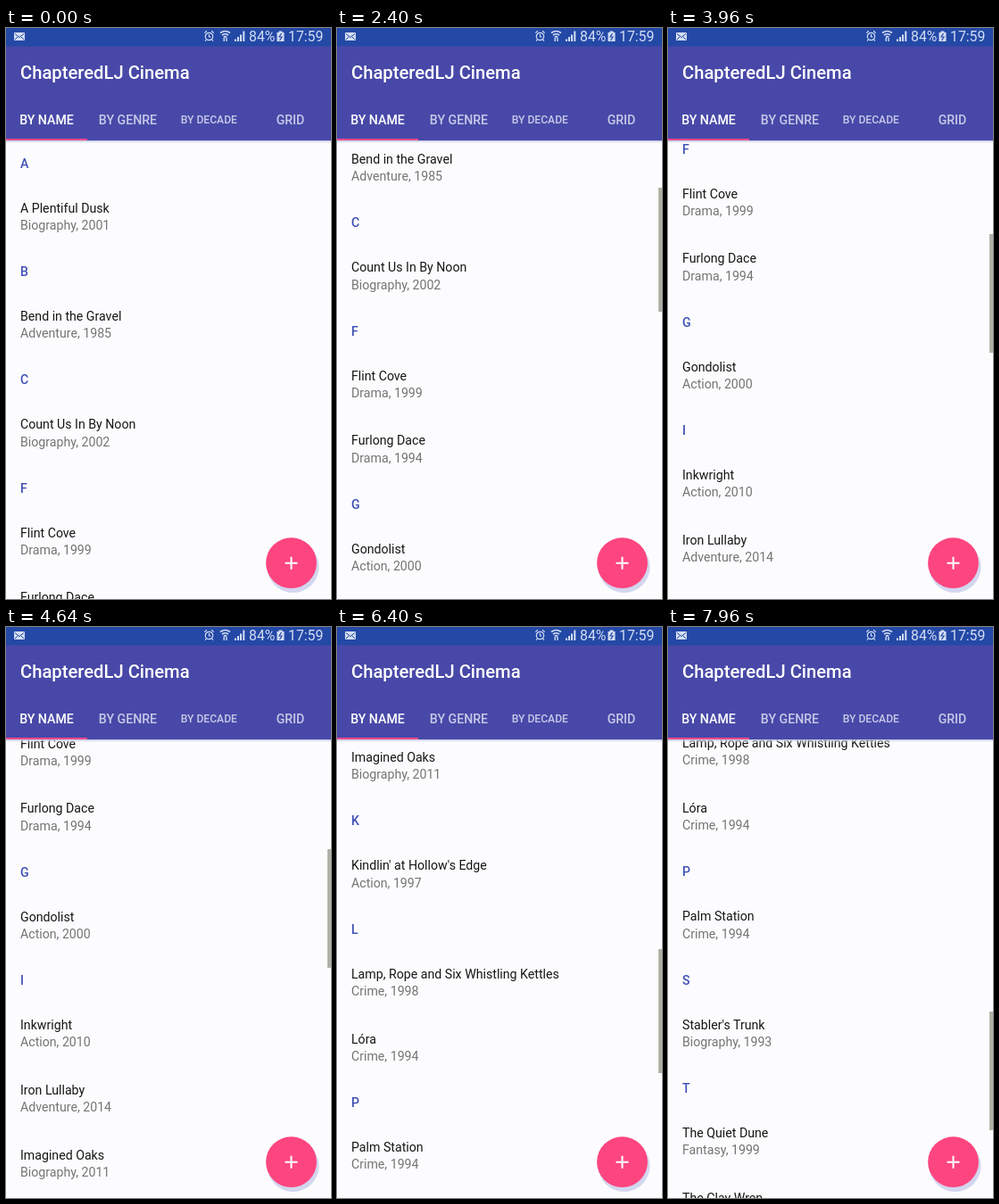
An HTML page that plays this animation: 364 px wide and 640 px high, repeating every 8000 ms.

```html
<!DOCTYPE html>
<html lang="en">
<head>
<meta charset="utf-8">
<title>Sectioned list</title>
<style>
  html, body { margin: 0; width: 100%; height: 100%; overflow: hidden; background: #fcfcfe; }
  svg { display: block; width: 364px; height: 640px; }
  text { font: 400 14.16px Roboto, "Noto Sans", sans-serif; }
  .head { font-weight: 500; fill: #3f51b5; }
  .name { fill: #161616; }
  .info { fill: #747474; }
  .bar { font-size: 20.22px; font-weight: 500; fill: #fff; }
  .tab { font-weight: 500; fill: #c6c9e8; text-anchor: middle; }
  .tab.on { fill: #fff; }
  .tab.small { font-size: 12.13px; }
  .status { font-size: 15.8px; fill: #d3def3; }
</style>
</head>
<body>
<svg viewBox="0 0 364 640">
  <defs>
    <linearGradient id="drop" x1="0" y1="0" x2="0" y2="1">
      <stop offset="0" stop-color="#b9bee0"/>
      <stop offset="1" stop-color="#fcfcfe" stop-opacity="0"/>
    </linearGradient>
  </defs>
  <rect width="364" height="640" fill="#fcfcfe"/>
  <g id="list"></g>
  <rect id="thumb" x="360" width="4" fill="#b0b0a6"/>

  <rect y="126" width="364" height="4" fill="url(#drop)"/>
  <rect width="364" height="126" fill="#4848a8"/>
  <rect width="364" height="20.5" fill="#2448a6"/>
  <text class="bar" x="16" y="57">ChapteredLJ Cinema</text>
  <text class="tab on" x="45.5" y="107.5">BY NAME</text>
  <text class="tab" x="136.5" y="107.5">BY GENRE</text>
  <text class="tab small" x="227.3" y="106.5">BY DECADE</text>
  <text class="tab" x="318.5" y="107.5">GRID</text>
  <rect y="124" width="91" height="2" fill="#ff4a8c"/>

  <g fill="none" stroke="#d3def3" stroke-width="1.2">
    <rect x="9" y="5" width="12" height="9" rx="1" fill="#d3def3" stroke="none"/>
    <path d="M10 6.5l5 4 5-4M10 13l3.5-3.5M20 13l-3.5-3.5" stroke="#2448a6" stroke-width="1"/>
    <circle cx="227.500" cy="9.500" r="4.200"/>
    <path d="M227.500 7v3h2M222.300 5.600l2.600-2.400M232.700 5.600l-2.600-2.400M224.300 13l-1.200 1.600M230.700 13l1.200 1.600"/>
    <path d="M240 5.500q5.500-4 11 0M242 8q3.500-2.600 7 0M243.800 10.300q1.700-1.300 3.400 0" stroke-width="1.600"/>
    <path d="M244.200 11v4M247 15v-4" stroke-width="1.4"/>
    <path d="M257 15v-2.5M260 15v-5M263 15V7.5M266.3 15V3.5" stroke-width="2"/>
    <path d="M303.500 5h2v-1.600h4V5h2v10h-8z" fill="#d3def3" stroke="none"/>
    <path d="M308.500 6l-2.500 4h3l-2.500 4" stroke="#2448a6"/>
  </g>
  <text class="status" x="272" y="15">84%</text>
  <text class="status" x="316" y="15">17:59</text>

  <circle cx="321.5" cy="604" r="29" fill="#d3d6ef"/>
  <circle cx="319.5" cy="599.7" r="28.4" fill="#fd457f"/>
  <path d="M312.5 599.7h14M319.5 592.7v14" stroke="#fff" stroke-width="2"/>
</svg>
<script>
const LOOP = 8000, STEP = 40;
const LIST_TOP = 127.4, VIEW = 513.3, HEAD = 48.53, ITEM = 72.8, TOTAL_ROWS = 31;

const sections = {
  A: ["A Plentiful Dusk|Biography, 2001"],
  B: ["Bend in the Gravel|Adventure, 1985"],
  C: ["Count Us In By Noon|Biography, 2002"],
  F: ["Flint Cove|Drama, 1999", "Furlong Dace|Drama, 1994"],
  G: ["Gondolist|Action, 2000"],
  I: ["Inkwright|Action, 2010", "Iron Lullaby|Adventure, 2014", "Imagined Oaks|Biography, 2011"],
  K: ["Kindlin' at Hollow's Edge|Action, 1997"],
  L: ["Lamp, Rope and Six Whistling Kettles|Crime, 1998", "Lóra|Crime, 1994"],
  P: ["Palm Station|Crime, 1994"],
  S: ["Stabler's Trunk|Biography, 1993"],
  T: ["The Quiet Dune|Fantasy, 1999", "The Clay Wren|Animation, 1994"]
};

// Each swipe: start ms, duration ms, distance px
const swipes = [
  [1400, 640, 62], [2040, 1240, 198],
  [3560, 1080, 175], [4640, 1200, 324.5],
  [6120, 1280, 263], [7680, 1240, 247]
];

const list = document.getElementById("list");
const thumb = document.getElementById("thumb");
const rows = [];
let end = 0;

function addText(kind, y, content) {
  const node = document.createElementNS("http://www.w3.org/2000/svg", "text");
  node.setAttribute("class", kind);
  node.setAttribute("x", 16);
  node.setAttribute("y", y);
  node.textContent = content;
  list.append(node);
}

function addRow(height) {
  rows.push({ top: end, bottom: end + height });
  end += height;
}

for (const [letter, items] of Object.entries(sections)) {
  addText("head", LIST_TOP + end + 29.3, letter);
  addRow(HEAD);
  for (const item of items) {
    const [name, info] = item.split("|");
    addText("name", LIST_TOP + end + 30.7, name);
    addText("info", LIST_TOP + end + 50, info);
    addRow(ITEM);
  }
}

function scrollAt(time) {
  return swipes.reduce((sum, [start, duration, distance]) => {
    const x = Math.min(1, Math.max(0, (time - start) / duration));
    return sum + distance * (1 - (1 - x) ** 2.5);
  }, 0);
}

// The thumb is sized from the average height of the visible rows.
function placeThumb(scroll) {
  const first = rows.findIndex(row => row.bottom > scroll);
  const shown = rows.filter(row => row.bottom > scroll && row.top < scroll + VIEW);
  const average = (shown[shown.length - 1].bottom - shown[0].top) / shown.length;
  const range = average * TOTAL_ROWS;
  const offset = first * average + scroll - rows[first].top;
  thumb.setAttribute("y", Math.round(LIST_TOP + VIEW * offset / range));
  thumb.setAttribute("height", Math.round(VIEW * VIEW / range + 2));
}

function draw(now) {
  const time = Math.floor(now % LOOP / STEP + 0.001) * STEP;
  const scroll = scrollAt(time);
  list.setAttribute("transform", `translate(0 ${-scroll.toFixed(2)})`);
  placeThumb(scroll);
  thumb.setAttribute("visibility", scroll > 0 ? "visible" : "hidden");
}

let origin;
function tick(now) {
  origin ??= now;
  draw(now - origin);
  requestAnimationFrame(tick);
}
draw(0);
requestAnimationFrame(tick);
</script>
</body>
</html>
```
